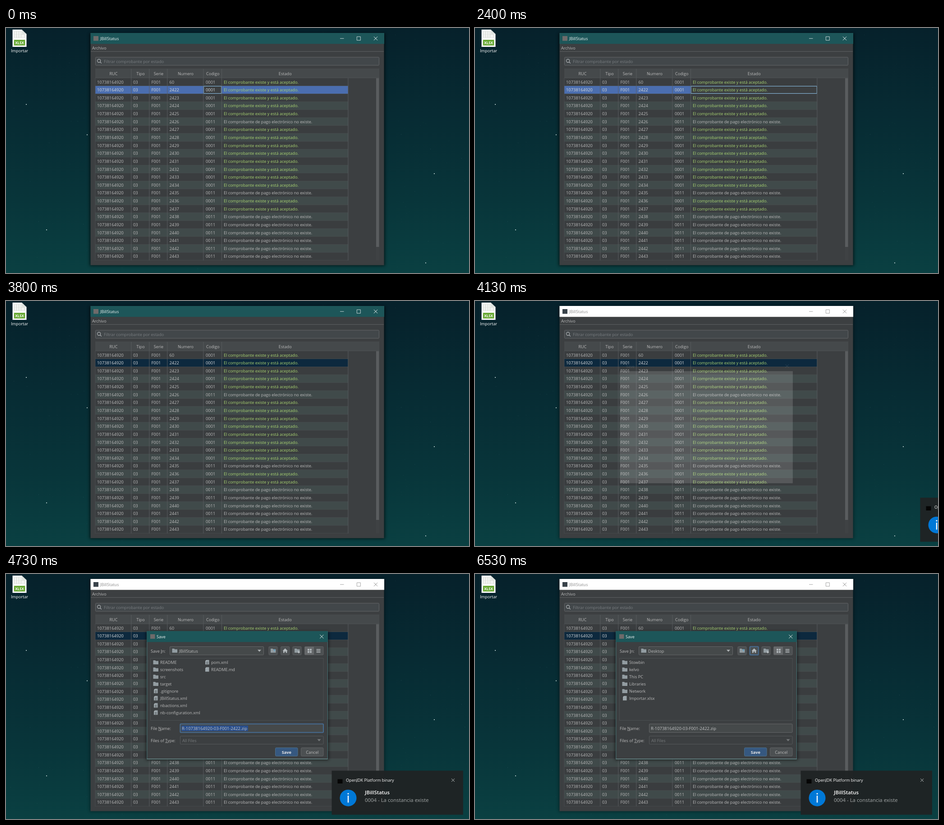
An HTML page that plays this animation: 1027 px wide and 545 px high, repeating every 8 s.

```html
<!DOCTYPE html>
<html lang="es">
<head>
<meta charset="utf-8">
<title>JBillStatus</title>
<style>
  html, body { margin: 0; width: 100%; height: 100%; overflow: hidden; background: #07272f; }
  svg { display: block; width: 100%; height: 100%; }
  text { font-family: "Open Sans", "Noto Sans", sans-serif; white-space: pre; }
</style>
</head>
<body>
<svg id="stage" viewBox="0 0 1027 545" xmlns="http://www.w3.org/2000/svg"></svg>
<script>
const LOOP = 8000;
const RUC = '10738164920';
const BODY = '#3c3f41', INK = '#bbbbbb', GREEN = '#a9d572', TEAL = '#1d5659', EDGE = '#646668';
const ICON = '#6e6a6a', ICON_DARK = '#39434a';
const SIZE = 9.15, DIGITS = 9.4;

// Markup helpers
const rect = (x, y, w, h, fill, extra = '') =>
  `<rect x="${x}" y="${y}" width="${w}" height="${h}" fill="${fill}" ${extra}/>`;
const box = (x, y, w, h, fill, stroke, extra = '') =>
  rect(x, y, w, h, fill, `stroke="${stroke}" ${extra}`);
const text = (x, y, s, fill = INK, size = SIZE, extra = '') =>
  `<text x="${x}" y="${y}" fill="${fill}" font-size="${size}" ${extra}>${s}</text>`;
const path = (d, fill, stroke = 'none', extra = '') =>
  `<path d="${d}" fill="${fill}" stroke="${stroke}" ${extra}/>`;
const group = (id, inner, extra = '') => `<g id="${id}" ${extra}>${inner}</g>`;
const cross = (x, y, r, color) =>
  path(`M${x - r} ${y - r}l${2 * r} ${2 * r}m0 ${-2 * r}l${-2 * r} ${2 * r}`, 'none', color);
const MIDDLE = 'text-anchor="middle"';

// Desktop
function desktop() {
  let seed = 11;
  const rnd = () => (seed = seed * 16807 % 2147483647) / 2147483647;
  let s = rect(0, 0, 1027, 545, 'url(#sky)');
  for (let i = 0; i < 300; i++) {
    s += rect((rnd() * 1027).toFixed(1), (rnd() * 545).toFixed(1), .8, .8, '#8fc0c0',
      `opacity="${(.06 + rnd() * rnd() * .3).toFixed(2)}"`);
  }
  for (const [x, y] of [[45, 170], [180, 237.5], [950, 324], [90, 449], [931, 522.5]]) {
    s += `<circle cx="${x}" cy="${y}" r="1" fill="#e4f4f2"/>`;
  }
  s += path('M14.500 3.500h20.500l10.500 10v28.500h-31z', '#fbfbfb') + path('M35 3.500v10h10.500z', '#dfe3df');
  s += path('M18.500 7.500h15v14h-15zM18.500 11h15M18.500 14.500h23M18.500 18h23M23.500 7.500v14M28.500 7.500v14M33.500 14.500h8v7h-8',
    'none', '#cfd3cb', 'stroke-width=".8"');
  s += rect(17.8, 26.3, 24.500, 12.500, '#62a52c');
  s += text(30, 35.5, 'XLSX', '#fff', 8, `${MIDDLE} font-weight="700"`);
  return s + text(30, 54, 'Importar', '#fff', SIZE, MIDDLE);
}

// Main window
const COLS = [198, 278, 318, 358, 438, 478.5, 759];
const TOP = 111.2, ROW = 17.636;
const rowY = i => TOP + i * ROW;
const missing = n => n === 2426 || n === 2435 || n > 2437;

function tableRow(i) {
  const n = i ? 2421 + i : 60, none = missing(n), y = (rowY(i) + 12.3).toFixed(2);
  const cells = [RUC, '03', 'F001', n, none ? '0011' : '0001'];
  const xs = [202, 282, 322.5, 362.5, 443];
  return group('row' + i,
    rect(198, rowY(i), 561, ROW, i % 2 ? '#404a4a' : '#3a3d3f') +
    cells.map((c, k) => text(xs[k], y, c, 'currentColor', DIGITS)).join('') +
    text(483, y, none ? 'El comprobante de pago electrónico no existe.' : 'El comprobante existe y está aceptado.',
      none ? 'currentColor' : GREEN), `color="${INK}"`);
}

function titleBar(id, bg, ink, icon) {
  return group(id,
    rect(187.5, 11, 651.5, 24.3, bg) + rect(194, 18, 11, 10.5, icon) +
    text(209, 27, 'JBillStatus', ink, 9) +
    path('M741 23.300h8.500M778.300 19.300h8v8h-8z', 'none', ink, 'stroke-width=".8"') + cross(820, 23.3, 4, ink));
}

function mainWindow() {
  let s = rect(185.5, 12, 655, 517, '#000', 'id="shadow" filter="url(#blur)"');
  s += rect(187.5, 11, 651, 516.5, BODY);
  s += titleBar('active', TEAL, '#f2f6f6', ICON) + titleBar('inactive', '#ffffff', '#8e8e8e', ICON_DARK);
  s += text(191, 47.8, 'Archivo') + rect(188, 51.7, 650, 1, '#616365');
  s += box(198.5, 65, 629, 18, '#42474a', EDGE, 'rx="1.5"');
  s += '<circle cx="206.2" cy="73" r="3.6" fill="none" stroke="#b8bbbd" stroke-width="1.1"/>';
  s += path('M208.800 75.700l3 3', 'none', '#b8bbbd', 'stroke-width="1.2"');
  s += text(217, 78, 'Filtrar comprobante por estado', '#797d80');
  s += rect(198, 90, 630, 21, '#45494b');
  ['RUC', 'Tipo', 'Serie', 'Numero', 'Codigo', 'Estado'].forEach((h, k) => {
    s += text((COLS[k] + COLS[k + 1]) / 2 + .5, 105.2, h, INK, SIZE, MIDDLE);
  });
  for (let i = 0; i < 23; i++) s += tableRow(i);
  for (let i = 1; i < 24; i++) s += rect(198, rowY(i) - .4, 561, .6, '#4b5152');
  COLS.forEach((x, k) => {
    if (k) s += rect(x - .6, k < 6 ? 91 : TOP, .9, k < 6 ? 426 : 406, '#5a5e60');
  });
  s += rect(197.5, 111, .8, 406, '#4d5153') + rect(198, 110.6, 630, .7, '#54585a');
  s += rect(821, 111.5, 7, 405.500, '#3f4244') + rect(821, 111.5, 6.5, 375.500, '#5a5d5f');
  return s + box(0, 0, 0, 0, BODY, '#8cc3e6', 'id="cell"');
}

// Save dialog
const folder = (x, y) => path(`M${x} ${y}h4.500l1.500 1.500h5.500v7.500h-11.500z`, '#929ca1');
const sheet = (x, y, lined) => path(`M${x + 3} ${y}h5.500v10h-8.500v-7z`, '#9aa4a9') +
  path(`M${x} ${y + 2.5}l2.500-2.500v2.500z`, '#c3cacd') +
  (lined ? path(`M${x + 2} ${y + 4.5}h4.500m-4.500 2h4.500m-4.500 2h4.500`, 'none', '#4a4f52', 'stroke-width=".8"') : '');
const entry = ([kind, name], i) => {
  const x = i < 8 ? 327 : 441, y = 192 + 16 * (i % 8);
  return (kind === 'd' ? folder(x - .5, y) : sheet(x + 1, y - .8, kind === 'x')) +
    text(i < 8 ? 342 : 455, y + 8.4, name);
};
const button = (x, id = '') => box(x, 161.5, 19, 18.5, '#4c5052', '#5e6163', `rx="1.5" ${id}`);
const arrow = (x, y, color) => path(`M${x} ${y}h8l-4 4.500z`, color);

const project = [['d', 'README'], ['d', 'screenshots'], ['d', 'src'], ['d', 'target'], ['x', '.gitignore'],
  ['x', 'JBillStatus.xml'], ['x', 'nbactions.xml'], ['x', 'nb-configuration.xml'], ['x', 'pom.xml'], ['f', 'README.md']];
const home = [['d', 'Stowbin'], ['d', 'kelvo'], ['d', 'This PC'], ['d', 'Libraries'], ['d', 'Network'], ['f', 'Importar.xlsx']];

function dialog() {
  const u = (s, k) => `${s.slice(0, k)}<tspan text-decoration="underline">${s[k]}</tspan>${s.slice(k + 1)}`;
  const file = `R-${RUC}-03-F001-2422.zip`;
  const head = rect(312.5, 127, 401, 24.300, TEAL) + rect(320, 134, 10.5, 10, ICON) +
    text(334, 143.2, 'Save', '#f4f7f7') + cross(700.3, 139.2, 4, '#e8eeee');
  let s = rect(312.5, 151, 401, 260.500, BODY);
  s += text(321, 174.5, u('Save In:', 5));
  s += box(363.5, 161.5, 208, 18.500, '#45494a', EDGE, 'rx="1.5"') + folder(368.5, 166) + arrow(558, 168.5, '#b0b4b6');
  s += button(583) + button(609.7, 'id="homeBtn"') + button(636);
  s += folder(587, 166) + path('M595.500 172.500v-5m-2 2l2-2l2 2', 'none', '#4fa3cf');
  s += path('M613.500 171l5.700-5.500l5.700 5.500h-1.500v4.500h-2.800v-3h-2.800v3h-2.800v-4.500z', '#b4babd');
  s += folder(640, 166) + path('M649.500 171.500v5m-2.500-2.500h5', 'none', '#d5dadc', 'stroke-width="1.2"');
  s += box(662.5, 161.5, 41.500, 18.500, '#4c5052', '#5e6163', 'rx="1.5"') + rect(663, 162, 20, 17.500, '#66696b');
  for (const [x, y] of [[669, 166.5], [674, 166.5], [669, 171.5], [674, 171.5]]) s += rect(x, y, 3.8, 3.8, '#b4babd');
  for (const y of [167, 170.2, 173.4]) s += rect(688.5, y, 9, 1.4, '#c0c5c8');
  s += box(320.5, 187.500, 383.500, 138, BODY, '#4b4f51');
  s += group('project', text(384, 174.5, 'JBillStatus') + project.map(entry).join(''));
  s += group('home', text(384, 174.5, 'Desktop') + home.map(entry).join(''));
  s += text(321, 346.8, u('File Name:', 5));
  s += box(386.5, 333.5, 317.500, 19, '#45494a', EDGE, 'id="field" rx="1.5"');
  s += rect(389.5, 337, 147.500, 12.500, '#2a4f8c', 'id="mark"');
  s += text(390, 346.8, file, '#c4c6c8', DIGITS) + rect(536.3, 337, 1, 12.500, '#d0d0d0', 'id="caret"');
  s += text(321, 373.6, u('Files of Type:', 9));
  s += box(386.5, 360.5, 317.500, 18, BODY, '#55585a', 'rx="1.5"') + text(391, 373.6, 'All Files', '#777a7c') + arrow(690.5, 367.500, '#777a7c');
  s += box(597.5, 386.5, 49.500, 18.500, '#365880', '#4c708c', 'rx="2"') + text(622.3, 399.6, 'Save', '#e6e6e6', 9.2, `${MIDDLE} font-weight="700"`);
  s += box(654.5, 386.5, 49.500, 18.500, '#4c5052', '#606365', 'rx="2"') + text(679.3, 399.6, 'Cancel', INK, SIZE, MIDDLE);
  s += box(312.8, 127.3, 400.500, 284.200, 'none', '#4c8588', 'stroke-width=".8"') + rect(312.5, 411, 401, .9, '#86b4b5');
  const dim = rect(310, 128, 406, 286, '#000', 'filter="url(#blur)" opacity=".5"');
  return group('dialog',
    group('blank', rect(312.5, 151, 401, 260.500, '#fff') +
      text(327, 143.2, 'Save', '#dfe5e5') + cross(700.3, 139.2, 4, '#dfe5e5')) +
    group('full', dim + s + head));
}

// Notification
function toast() {
  return group('toast',
    rect(722.5, 437.5, 291.500, 98, '#1f2425', 'opacity=".97"') +
    rect(735.5, 456.5, 11, 9.500, '#050505') +
    text(754, 462.3, 'OpenJDK Platform binary', '#fff') + cross(991.6, 458.6, 3.4, '#c4c8c8') +
    '<circle cx="759" cy="498.200" r="18.500" fill="#0078d7"/>' +
    '<circle cx="759" cy="488.800" r="1.600" fill="#fff"/>' + rect(757.8, 493, 2.4, 15.500, '#fff') +
    text(796, 490, 'JBillStatus', '#fff', 11.4, 'font-weight="600"') +
    text(796, 506.6, '0004 - La constancia existe', '#a6aaaa', 11.42));
}

const stage = document.getElementById('stage');
stage.innerHTML = `<defs>
  <linearGradient id="sky" x1="0" y1="0" x2="0" y2="1">
    <stop offset="0" stop-color="#06212b"/><stop offset=".35" stop-color="#072b33"/>
    <stop offset=".7" stop-color="#08353a"/><stop offset="1" stop-color="#0a4042"/>
  </linearGradient>
  <filter id="blur" x="-10%" y="-10%" width="120%" height="120%"><feGaussianBlur stdDeviation="3"/></filter>
</defs>` + desktop() + mainWindow() + dialog() + toast();

const $ = id => document.getElementById(id);
const show = (id, on) => { $(id).style.display = on ? '' : 'none'; };
const set = (id, attrs) => { for (const k in attrs) $(id).setAttribute(k, attrs[k]); };
const within = (t, a, b) => t >= a && t < b;

function drawTable(t) {
  const picked = within(t, 1330, 2400) ? 2 : 1, col = t < 1330 ? 4 : 5, blurred = t >= 3400;
  for (const i of [1, 2]) {
    const on = i === picked, plain = i % 2 ? '#404a4a' : '#3a3d3f';
    $('row' + i).firstChild.setAttribute('fill', !on ? plain : blurred ? '#0d293e' : '#4b6eaf');
    set('row' + i, { color: on ? '#d8dadc' : INK });
  }
  // The focused cell lies between its row's fill and text
  const fill = $('row' + picked).firstChild;
  if (fill.nextSibling !== $('cell')) fill.after($('cell'));
  show('cell', !blurred);
  set('cell', { x: COLS[col] + .6, y: rowY(picked) + .6, width: COLS[col + 1] - COLS[col] - 1.4, height: ROW - 1.5 });
}

function drawDialog(t) {
  const open = t >= 4130, step = Math.floor((t - 4130) / 66.6);
  show('dialog', open);
  show('toast', open);
  if (!open) return;
  const scale = step < 5 ? 1 - .043 * .4 ** step : 1;
  set('dialog', {
    transform: `translate(513 269.5) scale(${scale}) translate(-513 -269.5)`,
    opacity: [.14, .5, .8, .95][step] ?? 1
  });
  show('blank', step === 0);
  show('full', step > 0);
  set('toast', { transform: `translate(${step < 9 ? 265 * .4365 ** step : 0} 0)` });

  const typing = t < 6270, atHome = t >= 6530;
  show('project', !atHome);
  show('home', atHome);
  show('mark', typing);
  show('caret', within(t, 4270, 4730) || within(t, 5270, 5730));
  set('field', { stroke: typing ? '#466d94' : EDGE, 'stroke-width': typing ? 2 : 1 });
  set('homeBtn', {
    stroke: typing ? '#5e6163' : '#466d94', 'stroke-width': typing ? 1 : 2,
    fill: within(t, 6330, 6530) ? '#5c6062' : '#4c5052'
  });
}

function draw() {
  const t = performance.now() % LOOP;
  const inactive = within(t, 3330, 3800) || t >= 4130;
  show('active', !inactive);
  show('inactive', inactive);
  set('shadow', { opacity: inactive ? .35 : .6 });
  drawTable(t);
  drawDialog(t);
  requestAnimationFrame(draw);
}
draw();
</script>
</body>
</html>
```
